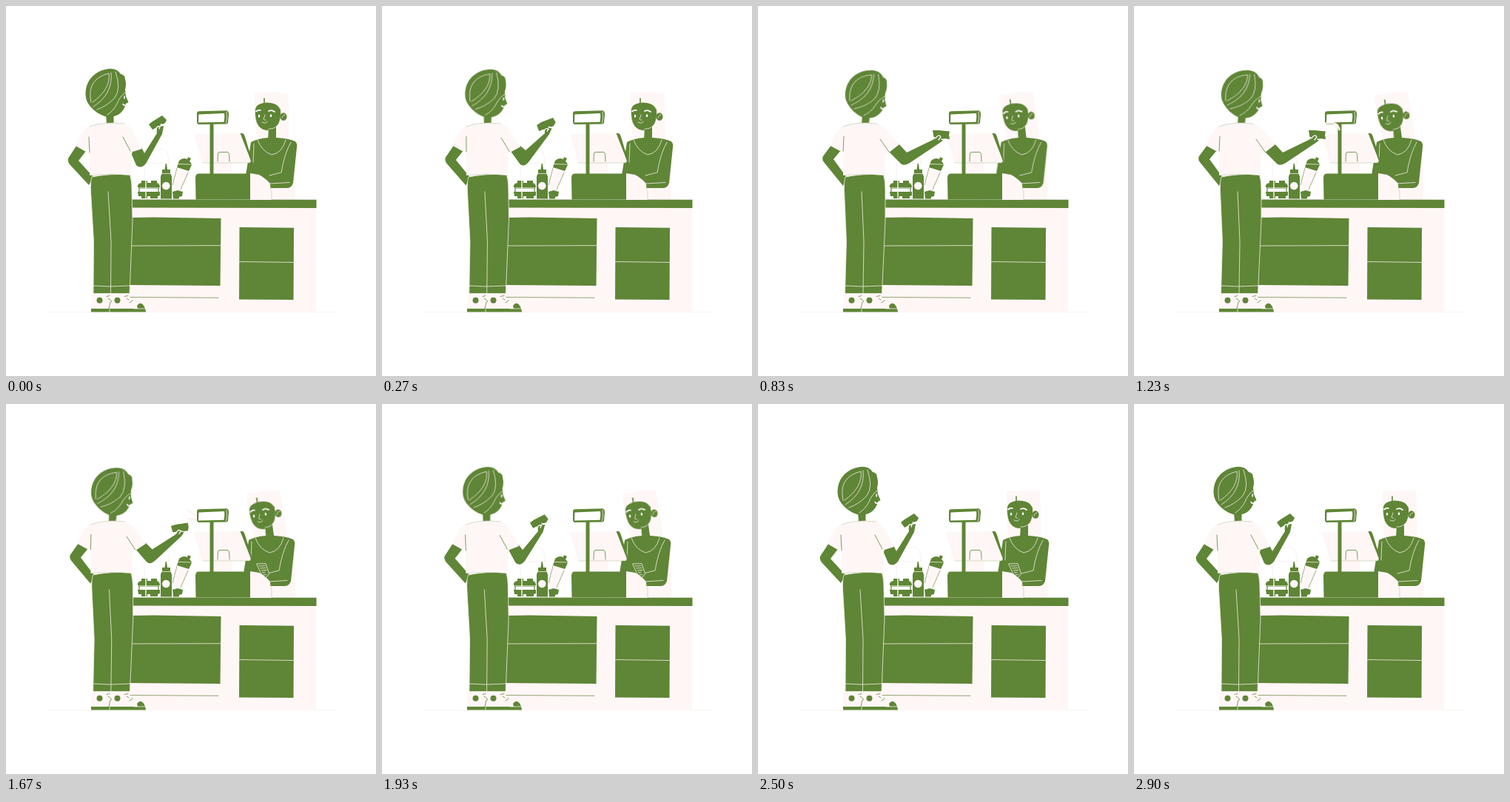
Animation of 500 by 500 pixels, one loop 3000 ms. Source, as an HTML page without scripts:

```html
<!DOCTYPE html>
<html lang="en">
<head>
<meta charset="utf-8">
<title>At the checkout</title>
<style>
html, body { margin: 0; width: 100%; height: 100%; overflow: hidden; background: #fff; }
svg { display: block; width: 100vw; height: 100vh; }

.g { fill: #5f8536; }
.p { fill: #fff6f6; }
.w { fill: #fff; }
.gl, .pl { fill: none; stroke-width: .8; stroke-linecap: round; stroke-linejoin: round; }
.gl { stroke: #5f8536; }
.pl { stroke: #f3efe6; }

.two, .three, .head, .lady, .torso, .eyes, .receipt, .wave { animation: 3s infinite; }
.two { animation-name: two; }
.three { animation-name: three; }
.head { animation-name: head; transform-origin: 141px 152px; }
.lady { animation-name: lady; transform-origin: 360px 178px; }
.torso { animation-name: torso; }
.eyes { animation-name: blink; transform-origin: 350px 148.5px; }
.receipt { animation-name: receipt; }
.w1 { animation-name: wave1; }
.w2 { animation-name: wave2; }

/* Customer: reach out, hold, draw back */
@keyframes two {
  0% { d: var(--a); animation-timing-function: ease-in-out; }
  19% { d: var(--b); }
  47% { d: var(--b); animation-timing-function: ease-in-out; }
  71%, to { d: var(--a); }
}
@keyframes three {
  0% { d: var(--a); animation-timing-function: ease-in; }
  9% { d: var(--m); animation-timing-function: ease-out; }
  19% { d: var(--b); }
  48% { d: var(--b); animation-timing-function: ease-in; }
  60% { d: var(--m); animation-timing-function: ease-out; }
  71%, to { d: var(--a); }
}
@keyframes head {
  0% { transform: none; animation-timing-function: ease-in-out; }
  19% { transform: translate(5px, 1.5px) rotate(9deg); }
  47% { transform: translate(5px, 1.5px) rotate(9deg); animation-timing-function: ease-in-out; }
  71%, to { transform: none; }
}

/* Cashier: lean in, lean back */
@keyframes lady {
  0%, 13.3% { transform: none; animation-timing-function: ease-in-out; }
  34% { transform: translate(-3px, 0) rotate(-8deg); }
  65% { transform: translate(-3px, 0) rotate(-8deg); animation-timing-function: ease-in-out; }
  82%, to { transform: none; }
}
@keyframes torso {
  0%, 13.3% { transform: none; animation-timing-function: ease-in-out; }
  34% { transform: translateX(-3px); }
  65% { transform: translateX(-3px); animation-timing-function: ease-in-out; }
  82%, to { transform: none; }
}
@keyframes blink {
  0%, 71% { transform: none; }
  73%, 75.5% { transform: scaleY(.3); }
  77.5%, to { transform: none; }
}
@keyframes receipt {
  0%, 46% { clip-path: inset(100% 0 0 0); }
  55%, 89% { clip-path: inset(-2px); }
  96.6%, to { clip-path: inset(100% 0 0 0); }
}
@keyframes wave1 {
  0%, 36% { opacity: 0; }
  39%, 46% { opacity: 1; }
  50%, to { opacity: 0; }
}
@keyframes wave2 {
  0%, 47% { opacity: 0; }
  51%, 56% { opacity: 1; }
  60%, to { opacity: 0; }
}
</style>
</head>
<body>
<svg viewBox="0 0 500 500">
  <path class="pl" d="M58 413.700H448"/>

  <!-- cashier -->
  <g class="lady">
    <path class="p" d="M336 119Q341 115 346 118Q360 115 375 118Q379 116 381 121Q383 150 382 182L339 184Q335 150 336 119Z"/>
  </g>
  <path class="p" d="M376 180L390 186L391 250H370Z"/>
  <g class="torso">
    <path class="g" d="M331 184Q340 179 354 178L366 178Q383 179 391 183Q394 186 393 191L388 239Q386 246 380 246H357L343 231L324 229L327 210Z"/>
    <path class="pl" d="M340 181Q345 196 359 201Q373 199 378 181M385 184Q376 200 372 225L356 229M357 240L383 238.500M335 186L334 211"/>
  </g>
  <g class="lady">
    <path class="g" d="M355 162H365V181Q360 183 354 181Z"/>
    <path class="g" d="M337 139Q338 133 348 131Q352 130 358 131Q367 132 371 140Q372 153 367 161Q361 168 352 168Q343 167 339 158Q336 148 337 139Z"/>
    <ellipse class="g" cx="375" cy="149.500" rx="4.500" ry="5.300"/>
    <path class="gl" style="stroke-width:1.600" d="M349 125V132"/>
    <path class="pl" d="M355 166Q362 167 367 161M373 151Q374 147 377 147M350 147L348 153Q349 155 351 154M346 157Q351 160 353 156"/>
    <path class="pl" style="stroke:#fff;stroke-width:1.700" d="M338 142.500Q341 140 344 141M355 142Q359 140 363 143"/>
    <g class="eyes w"><ellipse cx="342" cy="148.700" rx="1.200" ry="2"/><ellipse cx="358" cy="148.300" rx="1.200" ry="2"/></g>
  </g>
  <g class="receipt">
    <path class="g" d="M339 216L351 215.500L355.500 229Q354 234 348 235.500L344 228Z"/>
    <path class="pl" d="M339 216L351 215.500L355.500 229Q354 234 348 235.500L344 228ZM342 219L350 218.500M343.500 222L351 221.500M345 225L352 224.500M346 228L350 227.500M347 231L352 230.500"/>
  </g>

  <!-- counter -->
  <path class="p" d="M357 246H391V262H357ZM166 272H419V414H166Z"/>
  <path class="g" d="M166 261.500L419.500 261.800V273L166 272.500Z"/>
  <path class="g" d="M166 286L200 285.500L290.500 287L289.500 378L166 377ZM315.500 299L389 299.700L388.500 397L315 396.500Z"/>
  <path class="pl" d="M166 324L291 323.700M315 345.500L389 346.500"/>
  <path class="gl" style="stroke-width:.7" d="M165 393.500L287 394.300"/>

  <!-- till -->
  <path class="p" d="M281 211H305V227H281Z"/>
  <path class="p" d="M254 173L318 172L332 212H265Z"/>
  <path class="g" d="M275.500 158H280.500V228H275.500Z"/>
  <path class="g" d="M316.500 172H320Q322 173 323 177L332.500 208Q333 213 329 212.500L331 209Z"/>
  <path class="gl" style="stroke-width:.5;opacity:.5" d="M266 212H330"/>
  <path class="gl" d="M286 210L286.500 199Q287 197.500 289 197.500H300Q302 198 302 210"/>
  <path class="g" d="M258 145Q258 142.500 261 142.300L298 141.300Q301 142 301 146L300 158L298 159.500L260 160Q258 159 258 157Z"/>
  <path class="w" d="M260.500 146.500L295 145Q296 150 294.500 156.800L260 157.500Z"/>
  <path class="pl" d="M298 143Q299.500 150 297.500 158"/>
  <path class="g" d="M256 232Q256 227 260 226.500H330V261.500H256.500Z"/>
  <path class="p" d="M330 226L342 228Q351 233 357 240L359 262H330Z"/>
  <path class="gl" style="stroke-width:.5;opacity:.5" d="M357 240V246L359 250V261"/>

  <!-- food and sauces -->
  <path class="pl" style="stroke:#f8eeee" d="M186 213H221M187 213V236M192 200Q205 192 214 194Q220 197 220 213"/>
  <path class="g" d="M183 239V236H191V239H196V236H204V239Q208 240 208 245H178Q177 240 183 239ZM178 251H208V256L205 257V260H195V257H191V260H183V257H179Z"/>
  <path class="gl" style="stroke-width:1.200" d="M179 246H207M180 246V251M206 246V251"/>
  <path class="g" d="M225 251L232 249L239 251L238 257L234 258V260.500H226Z"/>
  <path class="pl" style="stroke-width:1.500" d="M189 236V260"/>
  <path class="g" d="M215.700 213H217L218 221H222V226L224 230V260.500H209V230L211 226V221H214.500Z"/>
  <path class="pl" d="M211 226.500H222"/>
  <circle class="p" cx="216.300" cy="243" r="5.300"/>
  <path class="p" d="M231 218L248 224L237 249Q229 250 225 244Z"/>
  <path class="g" d="M234 209Q239 204 245 207L246 204L250 206L248 210Q252 213 250 217L247 223L231 218Z"/>
  <path class="pl" d="M233 213.500L249 214"/>
  <path class="gl" style="stroke-width:.6" d="M231 219L225 242M246 225L236 248"/>

  <g class="pl" style="stroke:#fff0f0;stroke-width:2.500">
    <path class="wave w1" d="M259 158.500L268 158Q276 159 277.500 167"/>
    <path class="wave w2" d="M245 143L255 150M246 155L256 156"/>
  </g>

  <!-- customer -->
  <path class="g two" style="--a:path('M95 189L84 206Q83 210 86 214L112 242L118 231L98 209L108 196Z');--b:path('M99 188L88 203Q86 207 89 211L115 243L120 232L102 207L112 195Z')"/>
  <path class="p" d="M117 389H166Q167 395 173 400L179 403L178 410H115Q114 398 117 389Z"/>
  <path class="g" d="M115 409H178L177 405Q180 401 183 402Q188 405 189 413.500H115Z"/>
  <path class="pl" d="M140 409V414M173 409H188"/>
  <circle class="g" cx="126.500" cy="397.800" r="4"/>
  <circle class="g" cx="150.500" cy="397.800" r="4"/>
  <path class="gl" d="M136 392.500L140 391.500M138 395L142 398M139 409L141 400L143 399M160 392.500L165 391.500M163 395L166 397M167 401L171 398"/>
  <path class="g two" style="stroke:#f3efe6;stroke-width:.8;--a:path('M116 231Q140 226 167 228Q170 233 170 250L171 290L167 388.500H118L118.500 318L114.500 250Q114 237 116 231Z');--b:path('M118 231Q142 226 169 228Q172 233 172 250L172 290L167.500 388.500H117.500L119.500 318L116.500 250Q116 237 118 231Z')"/>
  <path class="pl two" style="--a:path('M138 251L142 318L141.500 388M118 378L140 379L168 378');--b:path('M140 251L143 318L142 388M118 378L140 379L168 378')"/>

  <path class="g three" style="--a:path('M167 194L183 191L187 199L204 172L203 164L213 162L211 173L189 213Q182 221 176 215Z');--m:path('M173 195L187 189L194 195L220 172L219 166L230 164L226 173L198 211Q191 219 186 213Z');--b:path('M176 196L190 186L201 198L238 180L242 175L253 178L247 184L205 212Q197 217 193 213Z')"/>
  <path class="g three" style="--a:path('M193 160L198 156L211 148L217 154L215 158L198 167Z');--m:path('M209 161L215 157L231 151L234.500 157L232 162L212 169Z');--b:path('M236 168L245 168L259 169.500L258 174L259 180L237.500 177Z')"/>
  <path class="pl three" style="stroke:#fff;stroke-width:1.300;--a:path('M203 168Q203 161 208 163L207 166M209 160L214 161');--m:path('M219 170Q220 164 225 166L223 169M225 163L230 165');--b:path('M240 179Q244 172 247 177L244 181M248 180L256 181')"/>

  <g class="head">
    <path class="g" d="M135 145H145.500V160H136Z"/>
    <path class="g" d="M107.500 118Q108 98 126 88.500Q147 79.500 155 92Q161 93 161 99Q163 106 161 113L162 122L165.500 130L162 132Q160 141 153 146Q147 150 138 150Q127 148 118 140Q107 131 107.500 118Z"/>
    <path class="pl" d="M115 130Q108 99 139 91Q142 112 117 130M142 90Q145 119 118 136M148 89Q156 112 147 124Q137 135 123 140M161 117Q154 122 150 132Q146 141 137 147"/>
    <path class="pl" style="stroke:#fff;stroke-width:1.500" d="M160 122V125M158 132.500Q160 135.500 163 133.500"/>
  </g>

  <path class="p two" style="--a:path('M114 162Q130 157 152 158Q166 159 170 167L184 193L171 197L170 200L169 229Q140 226 113 229L113 192L108 197L94 189Q102 168 114 162Z');--b:path('M115 162Q130 157 152 158Q168 160 174 168L191 187L177 198L171 200L171 229Q140 226 115 229L115 192L111 196L98 189Q104 168 115 162Z')"/>
  <path class="gl two" style="--a:path('M112 177L113 198M158 177L168 196');--b:path('M116 176L115 196M165 180L177 197')"/>
  <path class="gl two" style="stroke-width:.5;opacity:.5;--a:path('M113 163Q130 156 160 159M113 229Q140 226 169 229');--b:path('M115 163Q130 156 162 159M115 229Q142 226 171 229')"/>
</svg>
</body>
</html>
```
